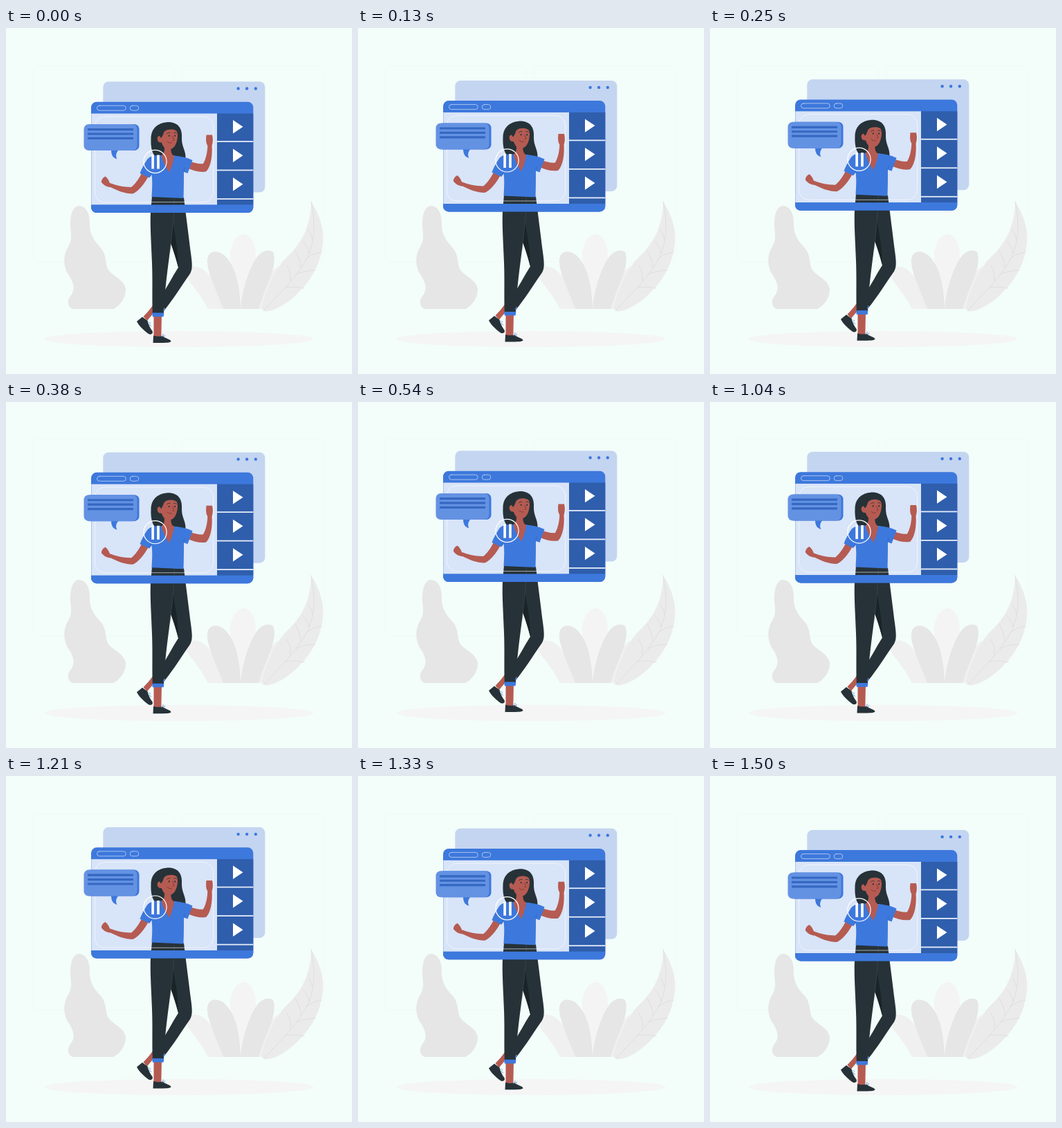
Recreate the animation shown at these times as an HTML page. Size 500x500 px, loop 1.54 s.

```html
<!DOCTYPE html>
<html lang="en">
<head>
<meta charset="utf-8">
<title>Floating video call</title>
<style>
  html, body { margin: 0; width: 100%; height: 100%; overflow: hidden; background: #f3fdf9; }
  svg { display: block; width: 100vw; height: 100vh; }
  .line { fill: none; stroke-linecap: round; stroke-linejoin: round; }
  .blue { fill: #3d78dc; }
  .dark { fill: #263238; }
  .skin { fill: #b55b52; }
</style>
</head>
<body>
<svg viewBox="0 0 500 500">
  <rect width="500" height="500" fill="#f3fdf9"/>
  <g class="line" stroke="#eef8f4" stroke-width=".6">
    <rect x="38" y="54.7" width="205" height="283" rx="5.5"/>
    <rect x="254.5" y="54.7" width="205" height="283" rx="5.5"/>
  </g>

  <!-- plants -->
  <path fill="#e5e6e5" d="M96 406C88 402 88 392 95 385C101 376 96 364 90 356C81 341 84 326 90 316C98 303 92 292 93 280C94 264 99 257 106 257C116 258 121 268 121 282C120 298 128 308 137 318C146 329 143 340 147 348C153 359 170 362 173 377C173 392 163 402 155 406Z"/>
  <path fill="#f0f0f0" d="M292 406C282 385 268 372 260 358C256 346 264 343 275 345C296 349 306 376 314 406ZM365 406C368 380 380 350 394 345C406 343 414 350 408 362C398 380 390 392 386 406Z"/>
  <path fill="#f4f4f4" d="M339 406C330 370 324 350 324 328C325 310 334 298 345 298C355 300 361 314 361 330C360 355 348 380 341 406Z"/>
  <path fill="#e5e6e5" d="M314 406C301 372 290 350 291 335C292 322 304 320 315 328C333 344 338 374 339 406ZM339 406C341 380 350 350 362 332C370 321 381 319 386 324C390 333 386 350 382 360C374 380 370 390 365 406Z"/>
  <path fill="#ebebeb" d="M441 251C452 268 460 290 458 308C456 340 440 366 420 385C405 399 390 408 376 409.500C371 409 369 407 370 402C374 383 386 355 401 336C420 318 440 297 441 251Z"/>
  <g class="line" stroke="#dedfde" stroke-width="1">
    <path d="M441 251C446 276 449 310 432 338C419 361 396 383 373 408"/>
    <path d="M403 375Q418 373 431 376M419 356Q433 350 447 350M434 333Q445 325 456 324M411 365Q412 353 406 343M426 346Q425 332 418 322M438 325Q436 315 429 309M443 306Q441 298 437 292"/>
  </g>
  <ellipse cx="250" cy="449.500" rx="194" ry="11.500" fill="#f4f5f4"/>

  <g id="float">
    <!-- back window -->
    <rect x="140.300" y="77.500" width="234" height="160" rx="8" fill="#c4d5f1"/>
    <g class="blue">
      <circle cx="335.600" cy="87.500" r="2.200"/>
      <circle cx="348.100" cy="87.500" r="2.200"/>
      <circle cx="360.800" cy="87.500" r="2.200"/>
    </g>

    <!-- front window -->
    <rect class="blue" x="123" y="106.700" width="234.300" height="160.300" rx="8"/>
    <g class="line" stroke="#c4d5f1" stroke-width=".8">
      <rect x="131.500" y="112.200" width="41.800" height="7" rx="3.500"/>
      <rect x="179.200" y="112.200" width="12.600" height="7" rx="3.500"/>
    </g>
    <rect x="123.300" y="123.600" width="181.700" height="132" fill="#d8e4f8"/>
    <rect x="305" y="123.600" width="52.300" height="132" fill="#2f5eac"/>
    <g id="list"></g>

    <!-- legs -->
    <path class="skin" d="M212 401C208 407 203 412 198.500 417L204 423C207 419 211 415 214 411Z"/>
    <path class="dark" d="M197 417.500L189 424C193 432 201 438 206 442C210 444 213 441 211.500 438C208 433 206 429 204.500 423Z"/>
    <path class="dark" d="M232 245L257 245C259 262 263 292 267 325C269 340 270 348 266 355C254 372 241 393 229.500 407L222 391C232 376 240 360 249 346C245 330 240 315 235 302Z"/>
    <path fill="#1a2428" d="M241 280C244 298 249 320 249 346C245 330 240 316 236 306Z"/>
    <path class="skin" d="M213.500 414H225L224.300 447H213.500Z"/>
    <path class="dark" d="M211 243L243 244.500C243 270 240 300 236 330C232 360 229 385 228 412H211.800C211 390 212 365 211 340C210 312 208 285 209 266Z"/>
    <path class="blue" d="M211.300 411.500H228.400L227.600 417.200H211.800Z"/>
    <path class="blue" d="M226.500 408L229.500 404.500L230 407L228 409Z"/>
    <path class="dark" d="M213 444.500C218 446 223 446 226.500 445C230 449 238 449.500 238.500 453C237 455.200 229 455 212.500 455Z"/>
    <g class="line" stroke="#7fa6e8" stroke-width=".7">
      <path d="M225 446L227 442L228.500 446L230 444L227 446.500M205 425L209 426L206.500 429L210 431L207 428"/>
    </g>
    <path class="line" stroke="#48545a" stroke-width=".5" d="M243 246V260C242 282 239 304 236.500 325"/>

    <!-- arms -->
    <path class="skin" d="M197 208C191 220 186 226 181 230C170 230 158 227 150 224C148 219 146 216 143.500 214.500C140 216 137.500 220 138 223C142 228 147 230 151 230C161 235 172 239.500 183 239.500C190 237 200 226 206.500 213Z"/>
    <path class="skin" d="M264 192C272 195 280 197 285 196C289 189 291 180 291.300 170C288.500 166 289 159 289.500 154.500H298C299.500 160 299 166 297.500 170C298.500 185 296 201 289 207.500C280 209 270 206 261 202Z"/>

    <!-- hair, torso, head -->
    <path class="dark" d="M236 136C221 136 209.500 144 209.500 160C209 172 211 182 217 187L240 184L259.500 188C260 177 254 172 254 160C255 146 250 137 236 136Z"/>
    <path class="blue" d="M225 184C216 183 208 185 204 190C200 196 196 203 193.500 210L207 216.500L210.500 212C212 224 211 234 210.500 244L256.500 246C257 233 257 220 257 208L262.500 210C265 203 268 196 269.500 191C261 187 252 185 243 184.500Z"/>
    <path class="skin" d="M228 168C230 176 229 181 224.500 184.500C227 193 231 201 236 208.500C240 200 242 192 243 185C239 183 238 178 238.500 172Z"/>
    <path class="skin" d="M228 148C226 153 224 156 222 156C218 156 217.500 162 221 165C224 166 225 165 225.500 167C227 173 233 176 238 175C245 173 248 163 248 155C248 148 244 144 238 144Z"/>
    <path class="dark" d="M222 156C222 148 226 141 236 138C246 138 250 145 251 152C247 149 245 147 241 146.500C236 146 231 147 228.500 150C227 154 226 157 224 159Z"/>
    <g class="dark">
      <ellipse cx="235.700" cy="155.800" rx=".9" ry="1.300"/>
      <ellipse cx="244.200" cy="155.800" rx=".9" ry="1.300"/>
    </g>
    <path class="line" stroke="#263238" stroke-width=".8" d="M232.500 152.500Q234.500 150.500 237 151.200M242.500 151.200Q244.500 150.500 246.300 152"/>
    <path class="line" stroke="#7d3431" stroke-width=".8" d="M240.800 156L243 162L240.800 162.500M233 164.200Q236 167 239.500 166"/>
    <path class="line" stroke="#2f5eac" stroke-width=".5" d="M207.500 215L211 208M257 208L258 202"/>

    <!-- player overlay -->
    <rect class="line" x="128.500" y="128" width="171" height="123.600" rx="14" stroke="#fff" stroke-width=".7" stroke-opacity=".85"/>
    <circle class="line" cx="215.500" cy="193" r="16.600" stroke="#fff" stroke-width="1.200"/>
    <path fill="#fff" d="M210.300 183.500h3.600v20h-3.600ZM218.200 183.500h3.600v20h-3.600Z"/>
    <path class="blue" d="M123 255.500H357.300V259A8 8 0 0 1 349.300 267H131A8 8 0 0 1 123 259Z"/>

    <!-- speech bubble -->
    <path class="blue" d="M152 176C152 184 155 188 160.500 189.300C158 185 159 180 163 176Z"/>
    <rect class="blue" x="115.500" y="139" width="77" height="38" rx="7"/>
    <rect x="112.500" y="139" width="77" height="38" rx="7" fill="#6492e3"/>
    <path fill="#3568c2" d="M118 145h66v3.200h-66ZM118 151.400h66v3.200h-66ZM118 157.800h66v3.200h-66Z"/>
  </g>
</svg>
<script>
  const LOOP = 1540, STEP = 1000 / 24, LAST = 36;
  const RISE = 10, TOP_AT = 735;
  const float = document.getElementById("float");

  document.getElementById("list").innerHTML = [0, 1, 2].map(i => {
    const y = 133 + i * 41.5;
    return `<path fill="#fff" d="M328 ${y}L342.500 ${y + 9.7}L328 ${y + 19.4}Z"/>` +
      `<rect x="305" y="${y + 30.1}" width="52.300" height="1.800" fill="#e6edf9"/>`;
  }).join("");

  // Linear bob: 0 at the highest point, RISE at the lowest.
  function drop(t) {
    const gap = Math.abs(t - TOP_AT);
    return RISE * Math.min(gap, LOOP - gap) / (LOOP / 2);
  }

  function draw(now) {
    const k = Math.min(LAST, Math.floor((now % LOOP + 5) / STEP));
    const dy = drop(k * STEP) - drop(0);
    float.setAttribute("transform", `translate(0 ${dy.toFixed(2)})`);
  }

  const start = performance.now();
  function tick() {
    draw(performance.now() - start);
    requestAnimationFrame(tick);
  }
  tick();
</script>
</body>
</html>
```
